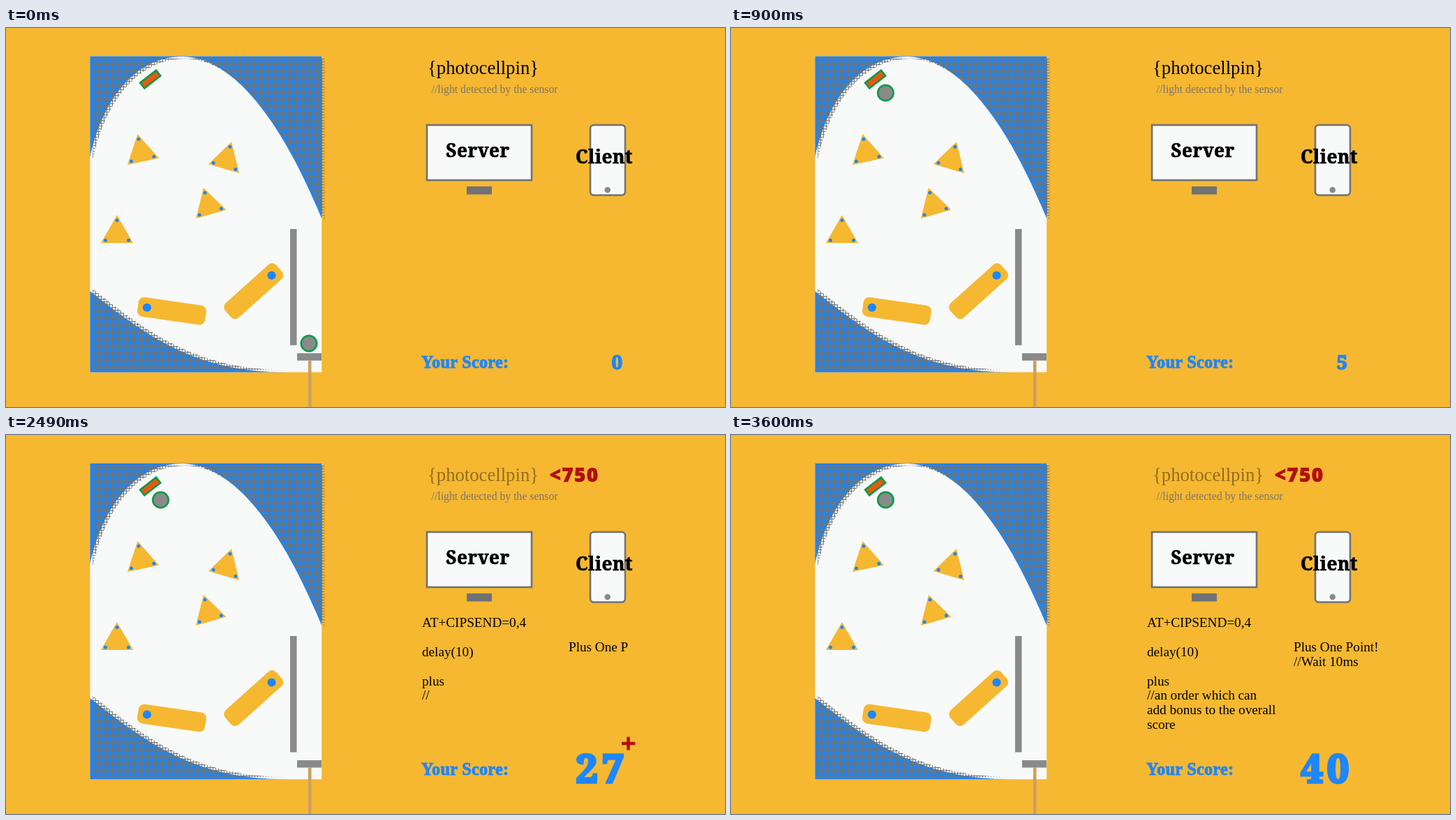
An HTML page for the animation above (5.4 s loop, 1030 by 543 pixels).

```html
<!DOCTYPE html>
<html lang="en">
<head>
<meta charset="utf-8">
<title>Pinball score</title>
<style>
  html, body { margin: 0; width: 100%; height: 100%; overflow: hidden; background: #f6b831; }
  svg { display: block; }
  text { font-family: "Liberation Serif", "Times New Roman", serif; white-space: pre; }
  .typed { font-size: 19.2px; }
  .device { font: 700 26.2px "Noto Serif", serif; letter-spacing: .5px; text-anchor: middle; stroke: #000; stroke-width: .7; }
  .label { font-size: 24.2px; font-weight: 700; letter-spacing: .3px; fill: #1e86ff; stroke: #1e86ff; stroke-width: .9; }
  #score {
    font-family: "Noto Serif", serif; font-weight: 900; letter-spacing: .1em; text-anchor: end;
    fill: #1e86ff; stroke: #1e86ff; stroke-width: .06em;
  }
  .limit { font: 800 28px "Open Sans", sans-serif; letter-spacing: 1.4px; fill: #b00f12; stroke: #b00f12; stroke-width: .7; }
  .frame { fill: #f8f9f9; stroke: #707274; stroke-width: 2.6; }
</style>
</head>
<body>
<svg width="1030" height="543" viewBox="0 0 1030 543">
  <defs>
    <pattern id="mesh" x="124" y="44" width="4" height="4" patternUnits="userSpaceOnUse">
      <path d="M0 .5H4M.5 0V4" stroke="#74736f"/>
    </pattern>
    <path id="top" d="M120.4 185V40.5H452.2V273C400 145 330 41 252 41C190 41 140 95 120.4 185Z"/>
    <path id="bottom" d="M120.4 377C200 440 270 493 400 493.2H120.4Z"/>
    <clipPath id="meshArea">
      <use href="#top" x="4" y="3"/>
      <use href="#bottom" x="4" y="-3"/>
    </clipPath>
  </defs>

  <rect width="1030" height="543" fill="#f6b831"/>

  <!-- Pinball table -->
  <rect x="120.4" y="40.5" width="331.8" height="452.7" fill="#f8f9f9"/>
  <g fill="#2583ea"><use href="#top"/><use href="#bottom"/></g>
  <rect x="120" y="41" width="340" height="452" fill="url(#mesh)" clip-path="url(#meshArea)"/>
  <g id="bumpers"></g>
  <g fill="#f6b831">
    <rect x="-49" y="-14" width="98" height="28" rx="8" transform="translate(237.5 405.5) rotate(8.3)"/>
    <rect x="-49" y="-14" width="98" height="28" rx="8" transform="translate(354.7 377) rotate(-42)"/>
  </g>
  <g fill="#1e86ff"><circle cx="202" cy="400.5" r="6.1"/><circle cx="380.5" cy="354.5" r="6.1"/></g>
  <rect x="-14.5" y="-5" width="29" height="10" transform="translate(206.7 73.6) rotate(-38)" fill="#e8590f" stroke="#0b9a48" stroke-width="2.7"/>
  <path d="M407 288h9.5v166.5h-9.5zM417 466h35v10.5h-35z" fill="#8a8a8a"/>
  <path d="M435.2 476.5V543" stroke="#cba062" stroke-width="4.6"/>
  <path id="track" fill="none" d="M434 452V285Q425 235 388.5 177.5Q362 138 329.5 111.5Q262 23 221.5 93"/>
  <circle id="ball" r="11.2" fill="#8a8a8a" stroke="#0b9a48" stroke-width="2.6"/>

  <!-- Sensor, devices and score -->
  <text id="pin" x="604" y="66" font-size="26.7">{photocellpin}</text>
  <text class="limit" id="limit" x="779" y="67">&lt;750</text>
  <text x="609.5" y="93" font-size="15.75" fill="#7b756a">//light detected by the sensor</text>
  <rect class="frame" x="603" y="139" width="150" height="79"/>
  <rect x="660" y="227" width="36" height="11.5" fill="#707274"/>
  <rect class="frame" x="837" y="139" width="50" height="100.5" rx="5"/>
  <circle cx="861.7" cy="232" r="4.3" fill="#8a8a8a"/>
  <text class="device" x="676" y="185">Server</text>
  <text class="device" x="857" y="194">Client</text>
  <g id="server"></g>
  <g id="client"></g>
  <text class="label" x="595" y="487">Your Score:</text>
  <text id="score"></text>
  <path id="plus" d="M882 442h19M891.5 432.5v19" stroke="#b00f12" stroke-width="4.4"/>
</svg>
<script>
const $ = id => document.getElementById(id);
const LOOP = 5400, FRAME = 30;
const clamp = (v, lo, hi) => Math.min(hi, Math.max(lo, v));

function add(parent, tag, attrs) {
  const el = document.createElementNS('http://www.w3.org/2000/svg', tag);
  for (const key in attrs) el.setAttribute(key, attrs[key]);
  return parent.appendChild(el);
}

// Each bumper has a dot slightly inside every corner.
const bumpers = [
  [[188.5, 152], [219, 186.5], [174, 196]],
  [[323, 163], [334, 208], [290, 195]],
  [[283, 229], [315.5, 260.5], [272, 273]],
  [[159, 268], [182, 308], [136, 308]]
];
for (const corners of bumpers) {
  add($('bumpers'), 'polygon', { points: corners.join(' '), fill: '#f6b831' });
  const [cx, cy] = [0, 1].map(i => corners.reduce((sum, c) => sum + c[i], 0) / 3);
  for (const [x, y] of corners)
    add($('bumpers'), 'circle', { cx: x + (cx - x) * .28, cy: y + (cy - y) * .28, r: 2.5, fill: '#1e86ff' });
}

// Returns a function that shows the first n characters of a block of lines.
function typist(id, x, lines) {
  const rows = lines.map(([y, words]) => [add($(id), 'text', { class: 'typed', x, y }), words]);
  return n => {
    for (const [el, words] of rows) {
      el.textContent = words.slice(0, Math.max(0, n));
      n -= words.length;
    }
  };
}
const typeServer = typist('server', 596, [
  [275, 'AT+CIPSEND=0,4'], [317, 'delay(10)'], [358.5, 'plus'],
  [379, '//an order which can '], [400, 'add bonus to the overall '], [421, 'score']
]);
const typeClient = typist('client', 806, [[310, 'Plus One Point!'], [330.5, '//Wait 10ms']]);

const track = $('track'), trackLength = track.getTotalLength();

function moveBall(t) {
  const u = clamp(t / 840, 0, 1);
  const eased = (u + .5 - .5 * Math.cos(Math.PI * u)) / 2;
  const p = track.getPointAtLength(eased * trackLength);
  $('ball').setAttribute('transform', `translate(${p.x} ${p.y})`);
}

function showScore(t) {
  const big = t >= 1770;
  const value = big
    ? Math.min(40, Math.floor(8.3 + (t - 1740) * .026))
    : Math.min(9, Math.round(t / 180));
  const score = $('score');
  score.textContent = value;
  score.setAttribute('x', big ? 891 : 885.5);
  score.setAttribute('y', big ? 498 : 488.5);
  score.setAttribute('font-size', big ? 56.5 : 27);
  $('limit').style.display = big ? '' : 'none';
  $('plus').style.display = big && value < 40 ? '' : 'none';
}

function draw(now) {
  const t = Math.floor(now % LOOP / FRAME) * FRAME;
  moveBall(t);
  showScore(t);
  $('pin').setAttribute('opacity', 1 - .6 * clamp((t - 1530) / 180, 0, 1));
  const typing = clamp((t - 1800) / 1800, 0, 1);
  typeServer(Math.floor(typing * 78 + 1e-6));
  typeClient(Math.floor(typing * 26 + .3));
}

let start;
function tick(now) {
  start ??= now;
  draw(now - start);
  requestAnimationFrame(tick);
}
draw(0);
requestAnimationFrame(tick);
</script>
</body>
</html>
```
